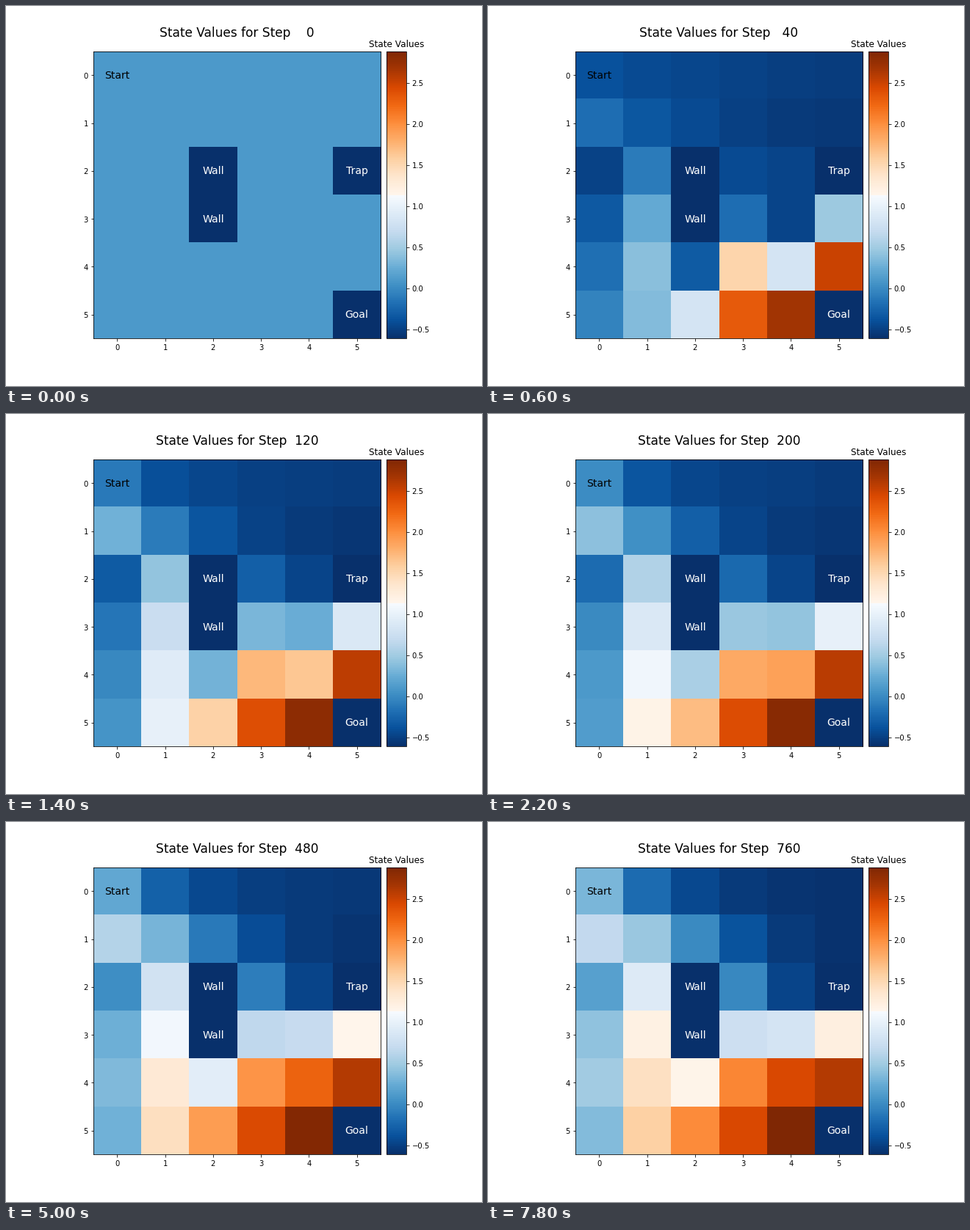
A matplotlib script that plays this animation: 648 by 518 pixels, repeating every 8 s.

```python
import numpy as np
import matplotlib.pyplot as plt
from matplotlib.animation import FuncAnimation
from matplotlib.colors import ListedColormap
from matplotlib.transforms import Affine2D

W, H, DPI = 648, 518, 72
FRAMES, INTERVAL = 40, 200
STEP, EARLY_STEP, LAST_STEP = 20, 40, 760
LOW, HIGH, INITIAL, FLOOR = -0.61, 2.883, 0.1, -0.6

WALLS = [(2, 2), (3, 2)]
TRAP, GOAL = (2, 5), (5, 5)

early, late = np.full((2, 6, 6), LOW)
pace = np.ones((6, 6))
cols = np.arange(6)


def fade(amp, reach, power=1):
    """Values that sink to the floor away from the left edge."""
    return FLOOR + amp * np.exp(-(cols / reach) ** power)


def leg(cells, first, final, speed):
    """Spread a few key values evenly along a straight run of cells."""
    place = np.linspace(0, 1, early[cells].size)
    for grid, keys in ((early, first), (late, final)):
        grid[cells] = np.interp(place, np.linspace(0, 1, len(keys)), keys)
    pace[cells] = speed


# The two top rows forget about the goal the further right they go.
early[0], late[0], pace[0] = fade(.22, 4.5), fade(.93, 1.15), 1 + cols
early[1], late[1], pace[1] = fade(.40, 2.3), fade(1.28, 2.3, 2), .6 + .6 * cols

# The runs that lead to the goal.
leg(np.s_[2:6, 0], (-.48, -.04), (.16, .56, .37), 1.4)
leg(np.s_[2:6, 1], (-.10, .40, .37), (.91, 1.34, 1.56), .65)
leg(np.s_[2, 3:5], (-.43, -.46), (-.02, -.46), 1.1)
leg(np.s_[3, 3:6], (-.20, -.46, .48), (.76, .83, 1.22), .6)
leg(np.s_[4, 2:4], (-.31, 1.52), (1.16, 2.04), .9)
leg(np.s_[4, 4:6], (.83, 2.51), (2.44, 2.61), .7)
leg(np.s_[5, 2:5], (.83, 2.32, 2.69), (2.01, 2.87), .5)

blocked = np.zeros((6, 6), bool)
for cell in [*WALLS, TRAP, GOAL]:
    blocked[cell] = True


def state_values(episodes):
    """Quick first guesses, then slow learning, both in log time."""
    if episodes <= EARLY_STEP + 1:
        grid = INITIAL + (early - INITIAL) * np.log1p(episodes) / np.log(EARLY_STEP + 2)
    else:
        u = np.log(episodes / (EARLY_STEP + 1)) / np.log((LAST_STEP + 1) / (EARLY_STEP + 1))
        grid = early + (late - early) * u ** pace
    return np.where(blocked, LOW, grid)


def add_axes(left, width):
    return fig.add_axes((left / W, 64.8 / H, width / W, SIDE / H))


def label(cell, text, color="white"):
    row, col = cell
    ax.text(col, row, text, color=color, fontsize=14, ha="center", va="center")


half = np.linspace(0, 1, 128)
cmap = ListedColormap(np.vstack([plt.cm.Blues_r(half), plt.cm.Oranges(half)]))

# A square plot with a bar 7% as wide and a 2% gap, centred as one block.
SIDE = 391.39
LEFT = 332.1 - 1.09 * SIDE / 2
fig = plt.figure(figsize=(W / DPI, H / DPI), dpi=DPI, facecolor="white")
ax = add_axes(LEFT, SIDE)
cax = add_axes(LEFT + 1.02 * SIDE, .07 * SIDE)

image = ax.imshow(state_values(0), cmap=cmap, vmin=LOW, vmax=HIGH, aspect="auto")
ax.set_xticks(cols)
ax.set_yticks(cols)
title = ax.set_title("", fontsize=17, pad=20)

fig.colorbar(image, cax=cax)
cax.set_title("State Values", fontsize=12)

label((0, 0), "Start", "black")
for wall in WALLS:
    label(wall, "Wall")
label(TRAP, "Trap")
label(GOAL, "Goal")

# Settle all text slightly lower on the pixel grid.
fig.draw_without_rendering()
for text in fig.findobj(plt.Text):
    text.set_transform(text.get_transform() + Affine2D().translate(0, -.4))


def update(i):
    step = STEP * max(i - 1, 0)
    image.set_data(state_values(step + 1 if i else 0))
    title.set_text(f"State Values for Step {step:4d}")
    return image, title


anim = FuncAnimation(fig, update, frames=FRAMES, interval=INTERVAL,
                     repeat=True, repeat_delay=0, blit=False)
plt.show()
```
